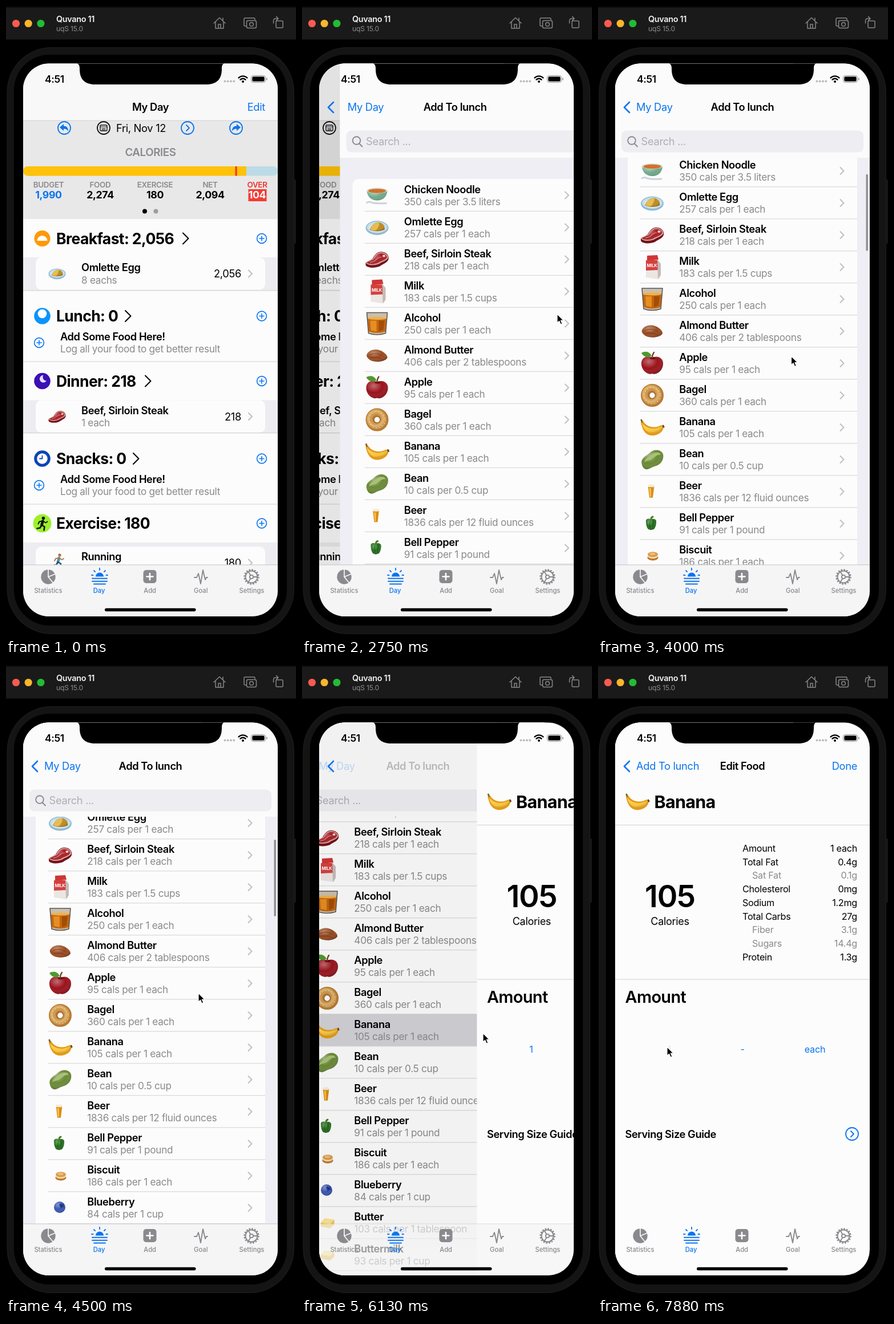
Recreate the animation shown at these times as an HTML page. Size 508 px wide and 1102 px high, loop 8000 ms.

```html
<!DOCTYPE html>
<html lang="en">
<head>
<meta charset="utf-8">
<title>Calorie diary</title>
<style>
html, body { margin: 0; width: 100%; height: 100%; overflow: hidden; background: #000; }
svg { display: block; width: 100%; height: 100%; }
text { font-family: Inter, "Liberation Sans", sans-serif; letter-spacing: -.017em; white-space: pre; }
text.b { letter-spacing: -.023em; }
path { stroke-linecap: round; stroke-linejoin: round; }
</style>
</head>
<body>
<svg id="stage" viewBox="0 0 508 1102"></svg>
<script>
const BLUE = '#0a74f0', GRAY = '#8a8a8e', PAGE = '#fcfcfc', LINE = '#d2d2d5', STEEL = '#868686';

// Shape helpers, each returning SVG markup
const rect = (x, y, w, h, fill, r = 0, more = '') =>
  `<rect x="${x}" y="${y}" width="${w}" height="${h}" rx="${r}" fill="${fill}" ${more}/>`;
const box = (x, y, w, h, color, r, sw) => rect(x, y, w, h, 'none', r, `stroke="${color}" stroke-width="${sw}"`);
const oval = (x, y, rx, ry, fill, more = '') =>
  `<ellipse cx="${x}" cy="${y}" rx="${rx}" ry="${ry}" fill="${fill}" ${more}/>`;
const disc = (x, y, r, fill, more) => oval(x, y, r, r, fill, more);
const ring = (x, y, r, color, w, more = '') => disc(x, y, r, 'none', `stroke="${color}" stroke-width="${w}" ${more}`);
const shape = (d, fill) => `<path d="${d}" fill="${fill}"/>`;
const lit = (d, fill) => shape(d, fill) + shape(d, 'url(#shine)');
const line = (d, color, w = 2) => `<path d="${d}" fill="none" stroke="${color}" stroke-width="${w}"/>`;
const group = (inner, more = '') => `<g ${more}>${inner}</g>`;
const at = (x, y, inner, s = 1) => group(inner, `transform="translate(${x} ${y}) scale(${s})"`);
const text = (x, y, s, size = 18.3, fill = '#000', weight = 400, anchor = 'start', more = '') =>
  `<text x="${x}" y="${y}" font-size="${size}" fill="${fill}" font-weight="${weight}" text-anchor="${anchor}"` +
  ` class="${weight > 500 ? 'b' : ''}" ${more}>${s}</text>`;
const rule = (x, y, w) => rect(x, y - .5, w, 1, LINE);
const chevron = (x, y, color = '#bfbfc4', s = 6, w = 2) => line(`M${x} ${y - s}l${s} ${s}-${s} ${s}`, color, w);
const plus = (x, y, more) => group(ring(x, y, 8.4, BLUE, 1.6) + line(`M${x - 4} ${y}h8M${x} ${y - 4}v8`, BLUE, 1.6), more);

// Food pictures, centred on 0,0
const food = {
  soup: line('M-18 13q5-3 9 0 8 2 25 1', '#cdd2d8', 3) + lit('M-18-8C-17 4-9 9 0 9S17 4 18-8z', '#6fa98c') +
    oval(0, -8, 18, 5, '#cfe0cd') + oval(0, -7.5, 15.5, 3.8, '#d2702f'),
  omelette: oval(0, 1, 20, 12.5, '#8fbad4') + oval(0, 0, 18, 10, '#c5dde9') + oval(0, 1, 14, 7.5, '#e3eef2') +
    lit('M-13 4C-10-4-3-10 6-8 12-6 14 0 13 4 6 8-6 8-13 4z', '#c08a22') + shape('M-12 3C-8-5-3-8 4-8 3-2 1 3-2 5-6 6-10 5-12 3z', '#e6bd55'),
  steak: shape('M-20 6L-8-1C-3-10 2-14 9-13 18-12 21-6 20 0 18 6 10 8 5 12-4 16-18 15-20 10z', '#74131a') +
    shape('M-20 5L-7-1C-3-9 2-13 9-12 17-11 20-6 19-2 16 3 8 4 3 8-5 11-18 11-20 5z', '#e2aaa0') +
    lit('M-18 5L-6 0C-2-8 3-11 9-10.500 15-9.500 18-6 17-3 14 2 7 2.500 2 6-5 9-16 9-18 5z', '#a81f29') +
    line('M-12 5q7-1 11-5t9-4', '#dd8a84', 1.2) + oval(12, -6, 2.6, 2, '#f3d2c4'),
  milk: shape('M-9-20l18-1 2 8-20 2z', '#cf3634') + shape('M-11-11H10l4 29-4 3-21-3z', '#ece6e3') +
    shape('M-11-12H9l2 17-22 1z', '#d4403e') + shape('M9-13l6 7v20l-5 7z', '#c3bbb8') +
    text(-.5, 0, 'MILK', 7.5, '#fff', 700, 'middle'),
  whisky: shape('M-18-19h36l-3 36q-15 5-30 0z', '#c9bfae') + shape('M-16.500-9h33l-2 23q-14 5-29 0z', '#c4660d') +
    shape('M-12-5h11v19l-10-2z', '#e58e22') + shape('M3-5h10l-2 16-8 3z', '#a24d08') +
    oval(0, -9, 16.5, 2.4, '#f0b04a') + line('M-18-19h36l-3 36q-15 5-30 0z', '#5d5650', 1.6),
  almond: lit('M-18-2C-13-12 2-13 11-6 16-3 18 1 18 4 14 11-3 13-12 8-17 5-19 1-18-2z', '#9a4b20') +
    line('M-13-1q12-7 24 3M-12 4q10-3 21 2', '#7c3714', .9),
  apple: lit('M-19 2C-20-11-8-14 0-10 9-14 20-10 19 2 18 13 8 21 0 18-8 21-18 13-19 2z', '#9b121b') +
    oval(1, -9, 5, 2, '#6d0b10') + line('M0-9q0-6 3-10', '#6b3c17', 2.2) + shape('M-1-13C-6-22-14-21-19-18-14-10-7-9-1-13z', '#4f9a2d'),
  bagel: ring(0, 0, 12.5, '#b67b36', 15) + ring(-1, -1, 12.5, '#cf994f', 10) + ring(-2, -2, 13, '#ddb06c', 4) +
    ring(0, 0, 14, '#efd8a8', 1.4, 'stroke-dasharray="1.6 4"') + ring(0, 0, 5.5, '#94612a', 1.2),
  banana: shape('M-20-9l4-2C-10-1 3 3 16-4l4 3C19 10 7 15-3 14-14 12-18 1-20-9z', '#e39a17') +
    lit('M-18-8C-11 2 3 6 18-3 16 8 4 11-5 9-13 6-17-1-18-8z', '#fcc63a') + line('M-18-10l-1-3', '#7f6a1f', 3) + line('M19-3l1 2', '#6b4a12', 3),
  bean: lit('M-18 9C-21-2-12-5-5-11 3-19 16-18 19-9 21 2 13 10 4 12-3 14-6 18-11 17-15 16-17 13-18 9z', '#6a8a36') +
    shape('M-14 5C-13-1-8-3-2-8 5-14 13-13 15-8 9-9 5-5 0-1-4 2-9 1-14 5z', '#a9c076'),
  beer: at(-2, 0, shape('M-9-16h18l-4 34H-5z', '#d98d17') + shape('M-6-10h6v26h-3z', '#f6c347') + rect(-9, -21, 18, 8, '#f6ecd6', 3), .6),
  pepper: at(-2, 0, lit('M-15-6C-16-16-4-15 0-12 5-16 17-14 15-4 15 8 9 19 4 17 1 19-2 19-5 17-11 18-15 4-15-6z', '#24701c') +
    line('M-3-8q-2 12 0 22M5-8q2 12 0 20', '#185212', 1.5) + line('M0-12q0-7 5-8', '#4c7a26', 5), .6),
  biscuit: at(1, 0, oval(0, 6, 17, 9, '#bd7a33') + oval(0, 1, 16, 8, '#f3dcae') + oval(0, -4, 16, 8, '#dc9a4b') + oval(-1, -6, 9, 4, '#eebd78'), .56),
  blueberry: lit('M-11-1a10 10 0 0 1 20 0a10 10 0 0 1-20 0z', '#3a57b4') +
    at(-1, 0, shape('M3-13l4 3 6-2-2 6 3 4-7 0-4 4-1-7-4-3z', '#22357d'), .58),
  butter: at(0, 0, shape('M-18 0l12-12 26 4v14L8 16l-26-5z', '#efc24c') + shape('M-18 0l12-12 26 4L8 4z', '#fbe48f'), .62),
};

const runner = (skin, shirt, legs) => disc(2, -9, 2.7, skin) + line('M1-4L-1 3', shirt, 4.6) +
  line('M1-4l5 3 3-2M0-4l-5 1-2 4', skin, 1.9) + line('M-1 3l5 3-1 6M-1 3l-3 5-5 1', legs, 2.6);

// Diary page
const header = (y, name, chevronX, icon, id = '') => at(63.5, y, icon) + text(88, y + 9.5, name, 26.5, '#000', 700) +
  (chevronX ? chevron(chevronX, y, '#000', 9.5, 2) : '') + plus(448, y, id);
const addRow = y => plus(58, y) + text(95, y - 4.5, 'Add Some Food Here!', 18.3, '#000', 600) +
  text(95, y + 16.5, 'Log all your food to get better result', 17.2, GRAY);
const entry = (y, icon, name, amount, cals) => rect(30, y, 446, 58, '#ececf1') + rect(52, y, 402, 56.5, PAGE, 10) +
  icon + text(132, y + 24, name, 18.3, '#000', 600) + text(132, y + 45.5, amount, 17.2, GRAY) +
  text(412, y + 35, cals, 18.3, '#000', 400, 'end') + chevron(425, y + 28.5);
const stat = ([x, label, value, color, tone]) => text(x, 316.5, label, 13.4, tone || GRAY, 600, 'middle') +
  (tone ? rect(424.5, 320, 32, 21, '#f63a32') : '') + text(x, 336, value, 17.8, color, 700, 'middle');
const bent = shape('M1-7l7 6-7 6v-3.5q-5-.5-8 4 0-9 8-9z', BLUE);
const halfSun = disc(0, 0, 14, '#fd9a0a') + shape('M-9 4a9 9 0 0 1 18 0z', '#fff');
const noon = disc(0, 0, 14.3, '#0c93fb') + disc(0, -4, 7.8, '#fff');
const moon = disc(0, 0, 14.3, '#3a10b4') + at(1, -3, shape('M1-9A8 8 0 1 0 8 3 8 8 0 0 1 1-9z', '#e4dcff'), .8);
const clock = disc(0, 0, 14.3, '#0a45b6') + disc(0, 0, 9.3, '#fff') + line('M0-5V0h-4.5', '#0a45b6', 1.8);

const dayPage = rect(30, 100, 446, 966, PAGE) + rect(30, 100, 446, 100, '#f8f8f8') + rect(30, 200, 446, 172, '#e8e8e8') +
  rule(30, 200, 446) +
  ring(102, 213, 11, BLUE, 1.8) + group(bent, 'transform="translate(102 213) scale(-1 1)"') +
  ring(171, 213, 11, '#111', 1.8) + box(165, 208, 12, 10, '#111', 1.5, 1.4) +
  line('M165 211h12M168 214h6M168 216h6', '#111', 1.2) +
  text(193, 219.5, 'Fri, Nov 12') + ring(318, 213, 11, BLUE, 1.8) + chevron(316, 213, BLUE, 5, 1.8) +
  ring(403, 213, 11, BLUE, 1.8) + at(403, 213, bent) +
  text(253, 262, 'CALORIES', 18.8, GRAY, 600, 'middle') +
  rect(30, 280, 446, 16.5, '#bddbe6', 8) + rect(30, 280, 30, 16.5, '#ffc208', 8) + rect(40, 280, 381, 16.5, '#ffc208') +
  rect(401.5, 280, 3.2, 16.5, '#f23a1d') +
  [[74.5, 'BUDGET', '1,990', BLUE], [165, 'FOOD', '2,274', '#000'], [261, 'EXERCISE', '180', '#000'],
   [357.5, 'NET', '2,094', '#000'], [440, 'OVER', '104', '#fff', '#f2302a']].map(stat).join('') +
  disc(243, 358.5, 4, '#000') + disc(262.5, 358.5, 4, '#9d9d9f') +
  header(406, 'Breakfast: 2,056', 310, halfSun) +
  entry(439, at(89.5, 467, food.omelette, .75), 'Omlette Egg', '8 eachs', '2,056') + rule(30, 497, 446) +
  header(541.5, 'Lunch: 0', 209, noon, 'id="addLunch"') + addRow(588) + rule(30, 621, 446) +
  header(655, 'Dinner: 218', 244, moon) +
  entry(688.5, at(89.5, 717, food.steak, .75), 'Beef, Sirloin Steak', '1 each', '218') + rule(30, 745.5, 446) +
  header(790.5, 'Snacks: 0', 223, clock) + addRow(837) + rule(30, 870, 446) +
  header(903.5, 'Exercise: 180', 0, disc(0, 0, 16, '#9cf02c') + runner('#111', '#111', '#111')) +
  rect(30, 937, 446, 60, '#ececf1') +
  entry(944, at(92, 968, runner('#b5764a', '#2f9bb5', '#2c4a78')), 'Running', '', '180') +
  rect(30, 100, 446, 966, '#000', 0, 'id="dayDim"');

// Food list page
const foods = [['soup', 'Chicken Noodle', '350 cals per 3.5 liters'], ['omelette', 'Omlette Egg', '257 cals per 1 each'],
  ['steak', 'Beef, Sirloin Steak', '218 cals per 1 each'], ['milk', 'Milk', '183 cals per 1.5 cups'],
  ['whisky', 'Alcohol', '250 cals per 1 each'], ['almond', 'Almond Butter', '406 cals per 2 tablespoons'],
  ['apple', 'Apple', '95 cals per 1 each'], ['bagel', 'Bagel', '360 cals per 1 each'],
  ['banana', 'Banana', '105 cals per 1 each'], ['bean', 'Bean', '10 cals per 0.5 cup'],
  ['beer', 'Beer', '1836 cals per 12 fluid ounces'], ['pepper', 'Bell Pepper', '91 cals per 1 pound'],
  ['biscuit', 'Biscuit', '186 cals per 1 each'], ['blueberry', 'Blueberry', '84 cals per 1 cup'],
  ['butter', 'Butter', '103 cals per 1 tablespoon'], ['butter', 'Buttermilk', '93 cals per 1 cup']];
const foodRow = ([icon, name, info], i) => {
  const y = 302 + 56 * i;
  return (icon === 'banana' ? rect(52, y, 402, 56, '#d1d1d6', 0, 'id="picked"') : '') +
    at(95, y + 28.5, food[icon]) + text(142.3, y + 24.5, name, 18.3, '#000', 600) +
    text(142.3, y + 45.5, info, 17.2, GRAY) + chevron(424.5, y + 28.5) + rule(73.5, y + 56.3, 380.5);
};
const listPage = rect(30, 100, 446, 966, '#eeeef4') +
  group(group(rect(52, 302, 402, 930, PAGE, 10) + foods.map(foodRow).join(''), 'id="rows"'), 'clip-path="url(#below)"') +
  rect(30, 100, 446, 165, '#fbfbfb') + rect(41, 217.5, 424, 38, '#ededf2', 9) +
  ring(59, 235, 6.8, GRAY, 1.9) + line('M64 240.5l5 5', GRAY, 1.9) + text(75.5, 243.2, 'Search ...', 18.3, '#aeaeb3') +
  rect(469.5, 305, 3.4, 134, '#8f8f92', 1.7, 'id="thumb"') + rect(30, 100, 446, 966, '#000', 0, 'id="listDim"');

// Food detail page
const facts = [['Amount', '1 each'], ['Total Fat', '0.4g'], ['Sat Fat', '0.1g', 1], ['Cholesterol', '0mg'], ['Sodium', '1.2mg'],
  ['Total Carbs', '27g'], ['Fiber', '3.1g', 1], ['Sugars', '14.4g', 1], ['Protein', '1.3g']];
const editPage = rect(30, 100, 446, 966, PAGE) + at(69, 239, food.banana) + text(98.5, 249.8, 'Banana', 30.5, '#000', 700) +
  rule(30, 279.5, 446) + text(126, 423, '105', 54, '#000', 600, 'middle') + text(126, 453.5, 'Calories', 18, '#000', 400, 'middle') +
  facts.map(([name, value, sub], i) => {
    const y = 326 + 23.7 * i, color = sub ? GRAY : '#000';
    return text(sub ? 270 : 253, y, name, 16.2, color) + text(454, y, value, 16.2, color, 400, 'end');
  }).join('') +
  rule(30, 549, 446) + text(47.5, 590, 'Amount', 29, '#000', 600) +
  text(125, 676.5, '1', 16.2, BLUE, 400, 'middle', 'id="one"') + text(253, 676.5, '-', 16.2, BLUE, 400, 'middle') +
  text(380, 676.5, 'each', 16.2, BLUE, 400, 'middle') +
  text(47.5, 825.5, 'Serving Size Guide', 18.3, '#000', 600) + ring(445, 819, 11, BLUE, 1.8) + chevron(443, 819, BLUE, 5, 1.8);

const nav = group(line('M55 168l-9 9 9 9', BLUE, 2.6), 'id="back"') +
  text(253, 183, 'My Day', 18.3, '#000', 600, 'middle', 'id="dayTitle"') +
  text(454, 183, 'Edit', 18.3, BLUE, 400, 'end', 'id="edit"') +
  text(67, 183, 'My Day', 18.3, BLUE, 400, 'start', 'id="backDay"') +
  text(253, 183, 'Add To lunch', 18.3, '#000', 600, 'middle', 'id="listTitle"') +
  text(67, 183, 'Add To lunch', 18.3, BLUE, 400, 'start', 'id="backList"') +
  text(253, 183, 'Edit Food', 18.3, '#000', 600, 'middle', 'id="editTitle"') +
  text(454, 183, 'Done', 18.3, BLUE, 400, 'end', 'id="done"');

const tabs = group(rect(30, 976, 446, 90, '#f5f5f6') + rect(30, 975.5, 446, 1, '#c6c6c8'), 'id="tabBack"') +
  disc(74, 997, 12.7, GRAY) + line('M74 983.5V997l12-5M74 997l8.5 10.5', '#f8f8f8', 1.7) +
  shape('M157 996.5a7 7 0 0 1 14 0z', BLUE) +
  line('M164 982v3M154 986l2 2M174 986l-2 2M150 994h2.5M178 994h-2.5M151 999.700h26M151 1004.700h26M154 1009.500h20', BLUE, 1.9) +
  rect(240.5, 985, 23, 23, GRAY, 5) + line('M252 991v11M246.5 996.5h11', '#fff', 2.6) +
  line('M330 998h4l3-7 4 18 4-24 4 17 2-4h2', GRAY, 1.9) +
  ring(430, 997, 10.5, GRAY, 2) + ring(430, 997, 12.5, GRAY, 2.4, 'stroke-dasharray="2.6 2.3"') + ring(430, 997, 3.2, GRAY, 1.8) +
  line('M433 997h7M428.5 994.5l-3.5-6M428.5 999.5l-3.5 6', GRAY, 1.8) +
  ['Statistics', 'Day', 'Add', 'Goal', 'Settings'].map((s, i) =>
    text(74 + 89.1 * i, 1025, s, 11.2, i === 1 ? BLUE : GRAY, 500, 'middle', 'style="letter-spacing:0"')).join('') +
  rect(173, 1051.8, 159.5, 5.4, '#000', 2.7);

const status = text(68, 134, '4:51', 17.5, '#000', 600) +
  [383.5, 388.7, 394, 399.3].map(x => disc(x, 131.5, 2, '#bdbdbf')).join('') +
  line('M407.5 125.5a10.5 10.5 0 0 1 15 0M410.5 128.7a6.3 6.3 0 0 1 9 0', '#000', 2.4) + disc(415, 132, 2, '#000') +
  box(429.5, 121.5, 25, 12, '#8c8c8c', 3.8, 1) + rect(431.3, 123.3, 21.4, 8.4, '#000', 2.3) +
  line('M456.8 126.3v2.6', '#8c8c8c', 1.5) +
  shape('M120 99h266q-8 1-8 9v2c0 18-9 27-27 27H156c-18 0-27-9-27-27v-2q0-8-9-9z', '#000');

const frame = rect(0, 0, 508, 58.5, '#1b1a1a') + rect(0, 0, 508, 2.5, '#050505') +
  ['#fb5a52', '#f9b62c', '#22bc35'].map((c, i) => disc(17.5 + 21.7 * i, 30.5, 6.6, c)).join('') +
  text(88, 28, 'Quvano 11', 14.4, '#f2f2f2', 600) + text(88, 44, 'uqS 15.0', 12.2, '#8d8d8d') +
  line('M364 30l10-9.5 10 9.5M367 28v11h14V28M372 39v-7h4v7M380 25v-4', STEEL, 1.5) +
  line('M421 35h-2q-2 0-2-2V23q0-2 2-2h15q2 0 2 2v1', STEEL, 1.5) +
  box(421.5, 25.5, 17, 13, STEEL, 2.5, 1.5) + ring(430, 32, 3.3, STEEL, 1.5) +
  box(473, 26, 12, 12, STEEL, 1.5, 1.5) + line('M468.5 30v-4q0-4 4-4h4M473.5 18.5l3.5 3.5-3.5 3.5', STEEL, 1.5) +
  rect(504, 303, 4, 112, '#161616', 1.5) +
  rect(1.5, 72, 503.5, 1025, '#1a1a1a', 78) + rect(3, 73.5, 500.5, 1022, '#141414', 77) + rect(14, 85, 478, 997, '#000', 62);

const pages = group(dayPage, 'id="day"') + group(listPage, 'id="list"') + group(editPage, 'id="detail"');
const pointer = '<path id="pointer" d="M0 0v15.5l3.6-3.3 2.6 5.8 2.7-1.2-2.5-5.6h4.9z" stroke="#fff" stroke-width="1.2"/>';
const shine = '<radialGradient id="shine" cx=".35" cy=".28" r=".8"><stop stop-color="#fff" stop-opacity=".38"/>' +
  '<stop offset=".5" stop-color="#fff" stop-opacity="0"/><stop offset="1" stop-opacity=".25"/></radialGradient>';
stage.innerHTML = `<defs>${shine}<clipPath id="screen">${rect(30, 100.5, 446, 965.5, '#000', 45)}</clipPath>` +
  `<clipPath id="below">${rect(30, 265, 446, 801, '#000')}</clipPath></defs>` +
  frame + group(pages + tabs + nav + status, 'clip-path="url(#screen)"') + pointer;

// Time, pointer x, pointer y, list scroll
const path = [[0, 522, 640, 0], [1000, 515, 610, 0], [1500, 447, 538, 0], [2875, 447, 538, 0], [3125, 446, 541, 0], [3625, 340, 650, 0],
  [3750, 340, 650, 0], [4250, 337, 573, 85], [4500, 337, 573, 110.5], [4750, 329, 594, 127], [5000, 319, 622, 138],
  [5125, 317, 628, 140.5], [5375, 317, 643, 140.5], [6625, 317, 643, 140.5], [7250, 121, 667, 140.5], [8000, 121, 667, 140.5]];
const follow = t => {
  const i = path.findIndex(k => k[0] > t), a = path[i - 1], b = path[i], u = (t - a[0]) / (b[0] - a[0]);
  return a.map((v, j) => v + (b[j] - v) * u);
};
const clamp = v => Math.max(0, Math.min(1, v));
const spring = ms => { const x = Math.max(0, ms) * .012; return 1 - (1 + x) * Math.exp(-x); };
const appear = p => clamp(2.2 * p - 1), vanish = p => clamp(1 - 2 * p);
const get = id => document.getElementById(id);
const shift = (id, x, y = 0) => get(id).setAttribute('transform', `translate(${x} ${y})`);
const fade = (id, o) => get(id).setAttribute('opacity', o);

function draw(now) {
  const t = Math.floor(now % 8000 / 125) * 125;
  const [, x, y, scroll] = follow(t);
  const p = spring(t - 2405), q = spring(t - 6015);

  shift('pointer', x, y);
  shift('day', -134 * p);
  shift('list', 446 * (1 - p) - 134 * q);
  shift('detail', 446 * (1 - q));
  shift('rows', 0, -scroll);
  shift('thumb', 0, (scroll - 110.5) / 6);
  fade('dayDim', .1 * p);
  fade('listDim', .1 * q);
  fade('tabBack', 1 - q);
  fade('thumb', clamp((t - 3750) / 125) * clamp((5750 - t) / 250));
  fade('addLunch', t >= 1875 && t < 2375 ? .3 : 1);
  fade('picked', t >= 5875 ? 1 : 0);
  fade('one', t >= 7625 ? .15 : 1);

  shift('dayTitle', -155 * p);
  shift('backDay', 155 * (1 - p) - 100 * q);
  shift('listTitle', 185 * (1 - p) - 132 * q);
  shift('backList', 132 * (1 - q));
  shift('editTitle', 180 * (1 - q));
  for (const id of ['dayTitle', 'edit']) fade(id, vanish(p));
  for (const id of ['backDay', 'listTitle']) fade(id, appear(p) * vanish(q));
  for (const id of ['backList', 'editTitle', 'done']) fade(id, appear(q));
  fade('back', appear(p));
  requestAnimationFrame(() => draw(performance.now()));
}
draw(performance.now());
</script>
</body>
</html>
```
